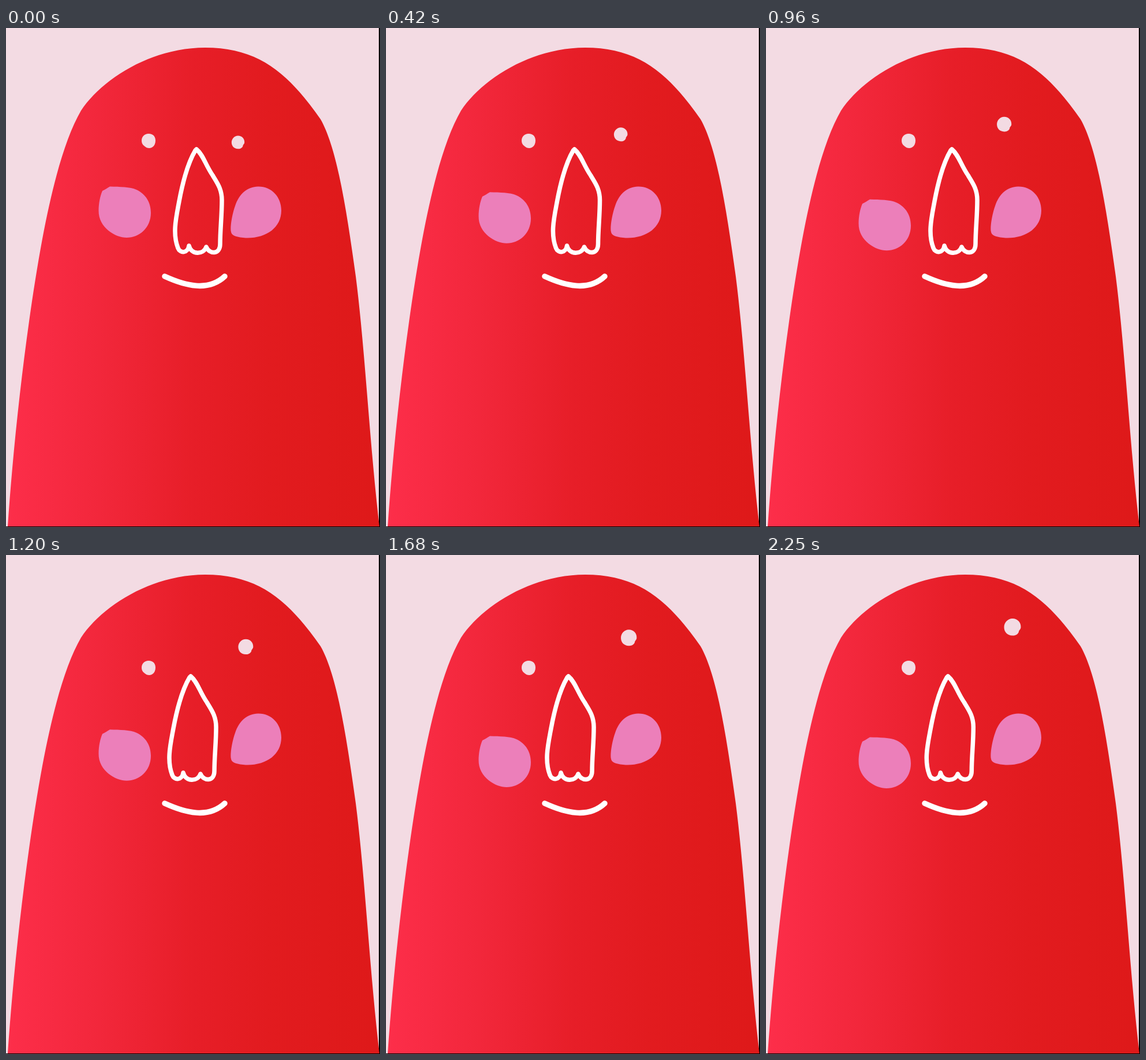
An HTML page that plays this animation: 648x864 px, repeating every 2310 ms.

```html
<!DOCTYPE html>
<html lang="en">
<head>
<meta charset="utf-8">
<title>Red face</title>
<style>
  html, body { margin: 0; width: 100%; height: 100%; overflow: hidden; background: #000; }
  svg { display: block; width: 100vw; height: 100vh; }
  .line { fill: none; stroke: #fff; stroke-linecap: round; stroke-linejoin: round; }
  .eye { fill: #f3dbe3; }
  .cheek { fill: #ec7fba; }
</style>
</head>
<body>
<svg viewBox="0 0 648 864">
  <defs>
    <linearGradient id="skin" gradientUnits="userSpaceOnUse" x1="0" x2="648" y1="0" y2="0">
      <stop offset="0" stop-color="#fd2e4a"/>
      <stop offset=".25" stop-color="#f2273b"/>
      <stop offset=".5" stop-color="#e71e28"/>
      <stop offset=".7" stop-color="#e21b1f"/>
      <stop offset="1" stop-color="#de1919"/>
    </linearGradient>
  </defs>
  <rect width="646" height="863" fill="#f3dbe3"/>
  <path fill="url(#skin)" d="M3 863C14 700 37 505 63 365C82 265 103 190 130 143C165 90 250 34 345 34C440 34 490 80 545 158C575 210 592 330 606 430C622 555 630 720 647 863Z"/>

  <path class="eye" d="M247 183C255 183 259 188 259 195C259 203 254 208 248 208C243 208 241 205 238 203C236 201 235 198 235 195C235 188 240 183 247 183Z"/>
  <path class="eye" id="eye" d="M0 -15C9 -15 15 -8 14.5 0C14.5 4 11 5 11 8C10 12 5 15 0 14.5C-9 14.5 -14.5 8 -14.5 0C-14.5 -8 -8 -15 0 -15Z"/>

  <path class="cheek" id="cheek" d="M167 282C172 280 175 277 180 274.5C197 275 215 275 226 280C243 288 251 303 251 320C251 346 231 363 209 363C190 363 160 346 160.5 316C160.5 304 163 291 167 282Z"/>
  <path class="cheek" d="M390 353C388 344 392 322 397 308C404 287 418 275 437 274.5C461 274.5 477 293 477 316C477 345 452 363.5 418 363.5C405 363 391 361 390 353Z"/>

  <path class="line" id="nose" stroke-width="7.5" d="M330 210C342 220 345 236 358 255C365 267 374 278 374 298C374 325 371 350 371 374C371 393 352 392 347 379C342 393 321 393 317 377C315 390 302 391 298 381C288 356 295 327 300 300C306 268 316 232 328 212Z"/>
  <path class="line" stroke-width="9.5" d="M275 430C310 446 350 457 379 430"/>
</svg>
<script>
  const LOOP = 2310, STEP = 30, EYE_END = 2250, SLIDE_END = 1770;
  const [eye, cheek, nose] = ['eye', 'cheek', 'nose'].map(id => document.getElementById(id));
  const start = performance.now();
  const lerp = (a, b, p) => a + (b - a) * p;
  const move = (el, value) => el.setAttribute('transform', value);

  function draw(now) {
    const time = Math.floor(Math.max(0, now - start) % LOOP / STEP) * STEP;
    const rise = Math.min(1, time / EYE_END);
    const slide = Math.min(1, time / SLIDE_END);
    move(eye, `translate(${lerp(402, 427, rise)} ${lerp(198, 125, rise)}) scale(${lerp(.77, 1, rise)})`);
    move(cheek, `translate(0 ${41 * slide})`);
    move(nose, `translate(${-14.7 * slide} 0)`);
    requestAnimationFrame(draw);
  }
  draw(start);
</script>
</body>
</html>
```
